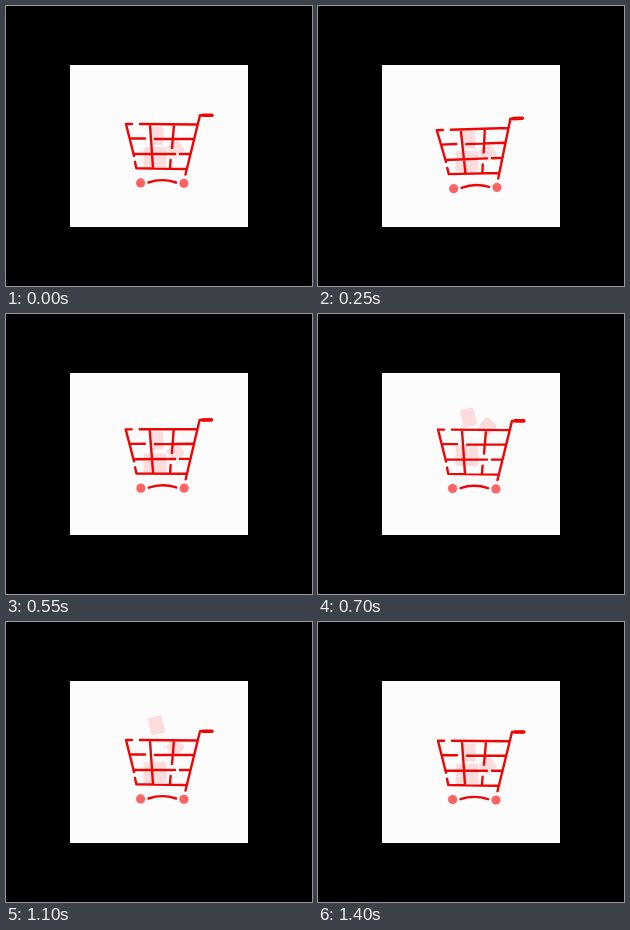
An HTML page with a canvas that plays this animation: 306x280 px, repeating every 1450 ms.

```html
<!DOCTYPE html>
<html lang="en">
<head>
<meta charset="utf-8">
<title>Bouncing cart</title>
<style>
html, body { margin: 0; width: 100%; height: 100%; overflow: hidden; background: #000; }
canvas { display: block; }
</style>
</head>
<body>
<canvas id="stage" width="306" height="280"></canvas>
<script>
const ctx = document.getElementById('stage').getContext('2d');
const LOOP = 1450, STEP = 50;
const RED = '#ee0505', WHEEL = '#ff6262', BLOCK = 'rgba(255, 15, 15, 0.13)';
const PIVOT = { x: 157, y: 150 };
const TAKEOFF = 480;

const span = (t, from, to) => Math.min(1, Math.max(0, (t - from) / (to - from)));
const ease = (t, from, to) => (1 - Math.cos(Math.PI * span(t, from, to))) / 2;

// Sinks under the load, springs up past its rest height, then settles.
function cartOffset(t) {
  const sink = 4.9 * ease(t, 0, 270);
  const spring = -8.7 * span(t, 260, 560) ** 3;
  const settle = 3.8 * ease(t, 560, 900);
  const landing = 0.7 * ease(t, 1150, 1400);
  return sink + spring + settle + landing;
}

const cartTilt = t => -2.2 * (ease(t, 0, 220) - ease(t, 450, 600));

const blocks = [
  { x: 150.5, y: 130, w: 14, h: 18, rise: 44, peak: 870, land: 1400, angle: 0, swing: -21 },
  { x: 169.5, y: 143, w: 14, h: 14, rise: 37, peak: 780, land: 1400, angle: 50, swing: -12 },
  { x: 149, y: 151.5, w: 23, h: 21, rise: 10, peak: 730, land: 1200, angle: 0, swing: 0 }
];

const frame = new Path2D(`
  M120 118H126 M134 118L191 118.5
  M120 118L128 150 M129 156L130.3 162.3L180 163
  M124 132.5H139 M149 133H187
  M128 148H169 M174 148H184
  M144 119L147 162 M168 119L166 142 M164.6 154L164 162
  M206 109.3H194L179.5 168.5
  M142.5 176.5Q156 171.8 170 176.5`);
const grip = new Path2D('M197 109.3H205.8');

function rotated(x, y, degrees, paint) {
  ctx.save();
  ctx.translate(x, y);
  ctx.rotate(degrees * Math.PI / 180);
  paint();
  ctx.restore();
}

function drawBlock({ x, y, w, h, rise, peak, land, angle, swing }, t) {
  const hop = ease(t, TAKEOFF, peak) - ease(t, peak, land);
  const ride = 0.8 * Math.max(0, cartOffset(t));
  rotated(x, y - rise * hop + ride, angle + swing * hop, () => {
    ctx.fillStyle = BLOCK;
    ctx.beginPath();
    ctx.roundRect(-w / 2, -h / 2, w, h, 2.5);
    ctx.fill();
  });
}

function drawWheel(x, y) {
  ctx.fillStyle = WHEEL;
  ctx.beginPath();
  ctx.arc(x, y, 4.6, 0, Math.PI * 2);
  ctx.fill();
}

function drawCart(t) {
  rotated(PIVOT.x, PIVOT.y + cartOffset(t), cartTilt(t), () => {
    ctx.translate(-PIVOT.x, -PIVOT.y);
    ctx.strokeStyle = RED;
    ctx.lineCap = ctx.lineJoin = 'round';
    ctx.lineWidth = 2.4;
    ctx.stroke(frame);
    ctx.lineWidth = 3.6;
    ctx.stroke(grip);
    drawWheel(134.6, 176.9);
    drawWheel(177.9, 177.3);
  });
}

function draw(now) {
  const t = Math.floor(now % LOOP / STEP) * STEP;
  ctx.fillStyle = '#000';
  ctx.fillRect(0, 0, 306, 280);
  ctx.fillStyle = '#fcfcfc';
  ctx.fillRect(64, 59, 178, 162);
  blocks.forEach(block => drawBlock(block, t));
  drawCart(t);
}

let start;
function tick(now) {
  start ??= now;
  draw(now - start);
  requestAnimationFrame(tick);
}
draw(0);
requestAnimationFrame(tick);
</script>
</body>
</html>
```
